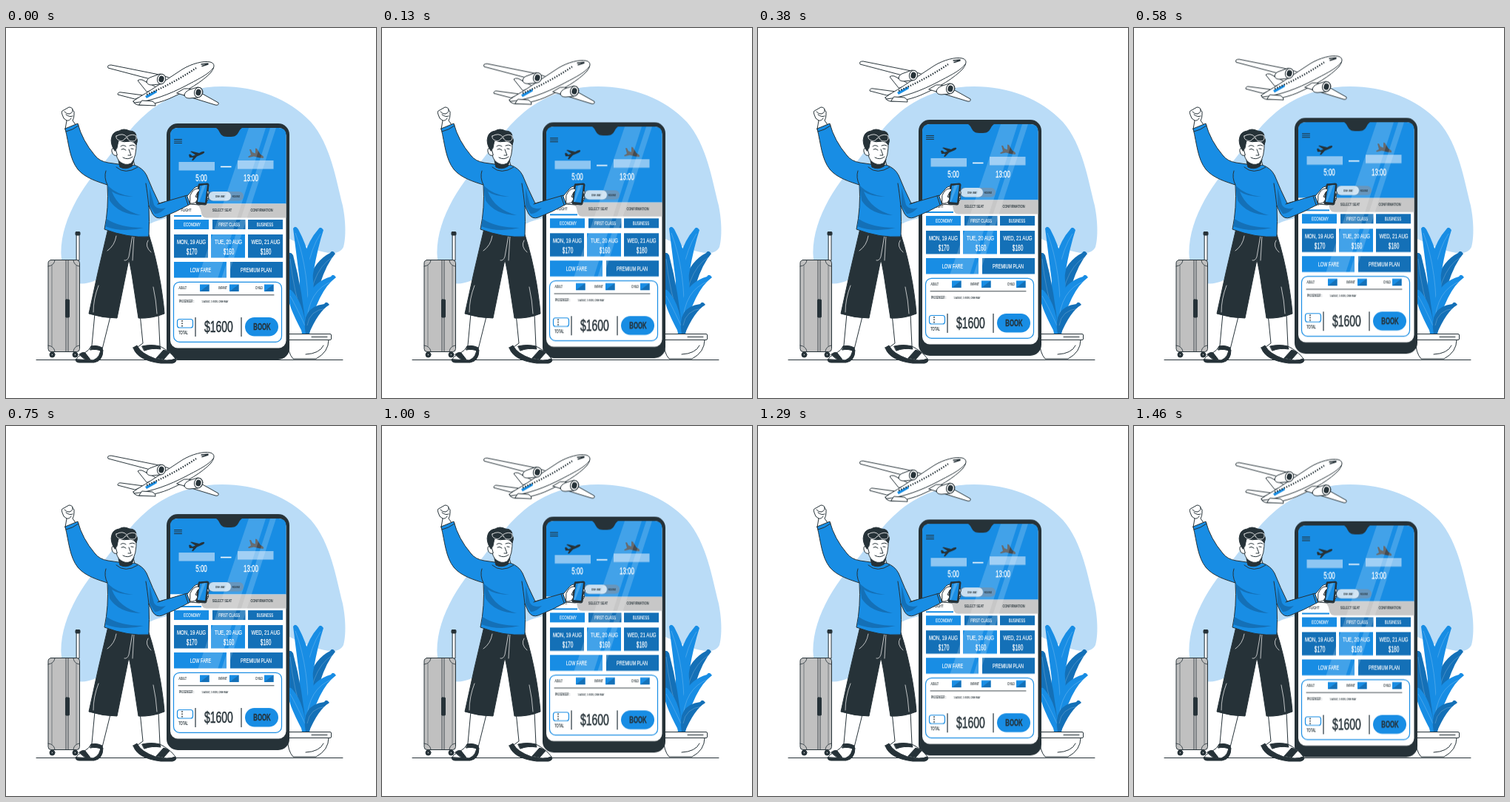
Animation, 500 px wide and 500 px high, one loop 1500 ms. Source, as an HTML page:

```html
<!DOCTYPE html>
<html lang="en">
<head>
<meta charset="utf-8">
<title>Flight booking</title>
<style>
html, body { margin: 0; width: 100%; height: 100%; overflow: hidden; background: #fff; }
svg { display: block; width: 100vw; height: 100vh; }
.float { animation: float 1500ms linear infinite; }
@keyframes float { 50% { transform: translateY(-10px); } }
.o { stroke: #263238; stroke-width: 1; stroke-linejoin: round; stroke-linecap: round; }
.n { fill: none; }
.w { fill: #fff; }
.d { fill: #263238; }
.b { fill: #188de4; }
.k { fill: #1470b7; }
.l { fill: #46a4e9; }
text { font-family: "Liberation Sans", Arial, sans-serif; text-anchor: middle; }
</style>
</head>
<body>
<svg viewBox="0 0 500 500">
  <path fill="#badcf7" d="M75 313C70 264 104 212 134 180C158 150 178 120 210 101C235 86 264 79 292 79C338 79 382 95 412 127C439 158 446 205 455 240C460 265 459 286 456 296C448 311 424 304 383 285C310 252 245 246 200 262C165 276 151 331 121 341C98 351 78 345 75 313Z"/>

  <path class="o n" d="M41 448.500H455"/>

  <g class="float o">
    <path class="w" d="M190 86L178 71Q180 69 184 70L205 81Z"/>
    <path class="w" d="M174 96L151 90Q151 86 156 87L186 91Z"/>
    <path class="w" d="M214 74L138 54Q136 50 142 50L197 61Q214 64 225 69Z"/>
    <path class="w" d="M172 99C178 94 190 88 200 81L238 56C251 48 267 44 276 46C283 48 282 53 277 60C265 73 244 85 226 93C210 101 190 105 178 104Q173 103 172 99Z"/>
    <path class="b" stroke="none" d="M188 92L203 84L204 87L190 95Z"/>
    <path class="n" d="M173 101C197 99 222 89 243 78S274 62 280 54"/>
    <path class="n" stroke-dasharray="1.6 1.8" d="M190 90Q226 75 257 54" style="stroke-linecap:butt;stroke-width:2.2"/>
    <path class="n" d="M264 49L273 48M265 51.500L273 49" style="stroke-width:1.4"/>
    <path class="w" d="M180 104L202 105Q203 102 198 99L184 98Z"/>
    <path class="w" d="M231 88L283 104Q288 105 287 101L262 87Q251 81 241 82Z"/>
    <path class="w" d="M190 73Q190 68 197 66L208 62Q216 63 215 70Q214 76 207 76L197 77Q191 77 190 73Z"/>
    <ellipse class="w" cx="210" cy="69" rx="5.600" ry="6.800" transform="rotate(15 210 69)"/>
    <ellipse class="d" cx="210" cy="69" rx="3" ry="4" transform="rotate(15 210 69)"/>
    <path class="w" d="M241 91Q241 86 249 83L259 80Q266 81 266 87Q265 93 259 94L248 95Q242 95 241 91Z"/>
    <ellipse class="w" cx="260" cy="87" rx="5.500" ry="6.700" transform="rotate(15 260 87)"/>
    <ellipse class="d" cx="260" cy="87" rx="3" ry="4" transform="rotate(15 260 87)"/>
  </g>

  <g id="plant"></g>
  <g class="o">
    <path class="w" d="M380 421H436Q436 438 419 447H388Q381 440 380 421Z"/>
    <rect class="w" x="374" y="413.500" width="65.500" height="8" rx="1.500"/>
    <path class="n" d="M413 417.500H434M405 441Q424 440 429 429"/>
  </g>

  <g class="float" id="phone">
    <rect class="d" x="217" y="129" width="166" height="319" rx="15"/>
    <rect class="w" x="222" y="135" width="156.500" height="297.500" rx="10"/>
    <path class="b" d="M222 237.500V145Q222 135 232 135H368.500Q378.500 135 378.500 145V237.500Z"/>
    <path class="d" d="M280 134C291 135 286 147 299 147H304C317 147 312 135 323 134Z"/>
    <path class="o n" d="M227.500 150.500H237.500M227.500 153H237.500M227.500 155.500H237.500"/>
    <path class="d" d="M247 171L249 170.500L252 173L256 171.500L249 167L251 166.500L261 169Q266 166 268 167Q269 169 264 171L258 173.500L253 179L251 179L253 175L248 175Z"/>
    <path fill="#464b50" d="M329 164L331 164L333 168L337 169.500L337 162.500L339 163L344 171Q349 173 348 175.500Q346 176 341 175L335 173.500L328 175L327 174L331 171.500Z"/>
    <path fill="#8ec6f2" d="M233.500 181H282V192.500H233.500ZM313 179H361.500V190.500H313Z"/>
    <path stroke="#fff" stroke-width="1.600" d="M290 187.500H304.500"/>
    <rect x="271" y="221" width="50" height="12.500" rx="6.200" fill="#467fae"/>
    <rect x="274" y="221" width="30" height="12.500" rx="6.200" fill="#c9dff0"/>
    <path fill="#c7c7c7" d="M222 237.500H378.500V256.500H270Q265 256.500 264 250Q262 238 254 237.500Z"/>
    <path class="w" d="M222 237.500H252Q260 238 262 247Q264 256 271 257H222Z"/>
    <path class="b" d="M227 253H264V255H227Z"/>
    <g id="buttons"></g>
    <rect x="226.500" y="343.300" width="146" height="81" rx="8" fill="#fff" stroke="#188de4" stroke-width="1.200"/>
    <path class="b" d="M262 346.500H274.500V356H262ZM302 346.500H314.500V356H302ZM349 346.500H361.500V356H349Z"/>
    <path class="k" d="M262 356L274.500 346.500V356ZM302 356L314.500 346.500V356ZM349 356L361.500 346.500V356Z"/>
    <path class="o n" d="M233 360.800H362" style="stroke-width:.9"/>
    <rect x="231.500" y="393.500" width="21" height="11.500" rx="3" fill="#fff" stroke="#188de4" stroke-width="1.200"/>
    <path class="o n" stroke-dasharray="1.700 1.700" d="M238 395V404" style="stroke-linecap:butt;stroke-width:1.5"/>
    <path stroke="#455158" stroke-width="1.400" d="M256 391V417M318 391V417"/>
    <rect class="b" x="323" y="391" width="45" height="25.500" rx="12.700"/>
    <path fill="#fff" opacity=".18" d="M328 135H351L285 342H258ZM357 135H365L298 342H290Z"/>
    <g id="labels"></g>
  </g>

  <g class="o" id="luggage">
    <path class="w" d="M95.500 279H99V314H95.500Z"/>
    <rect class="d" x="94" y="275.500" width="6" height="4.500" rx="1"/>
    <circle class="d" cx="62.500" cy="441.500" r="3.500"/><circle class="d" cx="93.500" cy="441.500" r="3.500"/>
    <circle class="w" cx="62.500" cy="441.500" r="1"/><circle class="w" cx="93.500" cy="441.500" r="1"/>
    <rect x="57" y="313.500" width="42.500" height="124" rx="4" fill="#c0c0c0"/>
    <path class="n" d="M81 314V437M84 314V437" style="stroke-width:.8"/>
    <path class="n" d="M62 321V430M95 321V430" style="stroke-width:.5"/>
    <rect class="d" x="80.500" y="367" width="5" height="24" rx="1"/>
    <path class="n" d="M57 322Q65 321 66 314M57 429Q65 430 66 437M99 322Q92 321 91 314M99 429Q92 430 91 437" style="stroke-width:.8"/>
  </g>

  <g class="o" id="man">
    <path class="w" d="M120 386L116 429Q112 436 105 440Q95 444 95 449H119Q128 447 130 434L142 386Z"/>
    <path class="w" d="M181 386L185 426L178 431Q183 440 202 447Q219 451 229 447Q222 437 208 430L206 386Z"/>
    <path class="d" d="M94 448Q94 452 99 452H119Q131 450 131 435L128 432Q128 445 118 449Z"/>
    <path class="d" d="M99 441Q104 437 107 439L114 448H107ZM115 430Q122 428 130 432L130 437Q122 433 114 435Z"/>
    <path class="d" d="M172 432L177 429Q182 440 201 447Q219 452 229 447Q232 451 225 453H209Q177 449 172 432Z"/>
    <path class="d" d="M184 430Q196 427 208 430L209 434Q197 432 187 436ZM203 446L213 435Q218 436 221 439L213 448Z"/>
    <path class="d" d="M138 271L193 279Q203 310 209 346Q213 371 214 386Q197 393 179 392L172 346Q169 325 166 313L150 392Q131 392 112 386Q124 329 138 271Z"/>
    <path class="n" d="M171 280L166 309Q164 315 160 314M173 280L171 314M149 281Q147 294 137 301M192 287Q187 295 196 303M118 384Q118 366 125 348M204 386Q203 368 199 350" style="stroke:#fff;stroke-width:.7"/>

    <path class="w" d="M80 137L82 125Q77 123 76 117Q74 112 78 111L85 107Q90 107 90 111Q93 112 92 117Q92 122 90 125L95 132Z"/>
    <path class="n" d="M79 113Q82 117 86 116Q91 114 90 110M81 117Q86 121 90 119M82 125Q86 126 88 122"/>
    <path class="w" d="M154 176L153 186Q159 195 168 191L174 186L172 178Z"/>
    <path class="b" d="M80 136L97 129Q103 152 120 172Q126 180 138 182L152 184Q161 192 173 185Q185 189 190 199Q198 219 207 237L245 226L249 238Q229 249 211 256Q203 259 198 251L193 240Q194 262 193 282Q165 284 133 272Q139 243 137 212C125 208 107 203 97 191C86 177 85 157 80 136Z"/>
    <path class="k" stroke="none" d="M137 212Q148 225 172 228Q153 228 143 221Q152 245 182 253Q152 252 140 233ZM136 258Q154 270 186 270Q157 277 134 268ZM194 216L200 239Q204 246 216 243Q207 252 201 251L194 240Z"/>
    <path class="n" d="M81 140Q90 138 98 132M137 212Q132 202 135 193M193 241Q191 222 189 210M242 227L246 239M149 188Q161 199 178 188M205 238L214 235"/>

    <path class="d" d="M152 179L154 188Q162 192 170 187L173 178Z"/>
    <path class="w" d="M147 153Q147 173 153 180Q161 187 169 183Q177 175 176 152Z"/>
    <path class="w" d="M148 164Q142 160 143 167Q145 174 150 172Z"/>
    <path class="d" d="M147 166Q140 156 143 147Q145 140 153 139Q159 135 167 139Q176 139 176 147Q179 152 176 158Q173 153 168 153Q159 155 152 152L150 162Z"/>
    <path class="n" d="M149 146Q158 141 163 147Q171 142 176 146Q177 153 171 153Q165 153 164 148L161 149Q158 154 153 152Q148 150 149 146Z" style="stroke:#fff;stroke-width:.8"/>
    <path class="n" d="M155 160Q158 157 162 160M167 159Q171 157 174 159M156 164Q159 162 162 165M169 163L172 163.500M166 164L169 172L165 172M158 175Q165 179 171 174"/>

    <path class="w" d="M245 227L252 219Q256 213 262 214L273 219Q275 223 273 227Q275 231 271 235Q268 239 261 239L249 238Z"/>
    <path class="d" d="M261 211L272 210Q274 210 274 212L271 237Q271 239 269 239L258 238Q256 237 257 235L260 213Q260 211 261 211Z"/>
    <path class="b" stroke="none" d="M262 213L272 212L269 236L259 235Z"/>
    <path class="l" stroke="none" d="M265 213L270 212L261 235H259Z"/>
    <path class="w" d="M249 226Q253 217 259 217Q264 218 259 222L256 228Q260 229 258 233Q256 238 249 237ZM272 220Q276 221 273 225M272 227Q275 228 272 231"/>
  </g>
</svg>
<script>
const el = id => document.getElementById(id);

// A leaf bends from base to a round tip through (cx, cy); w sets its fullness.
const leaf = ([x, y, cx, cy, bx, by, w, c]) =>
  `<path class="${c}" d="M${bx} ${by}Q${cx - w} ${cy} ${x - 3} ${y + 2}Q${x} ${y - 3} ${x + 4} ${y + 3}Q${cx + w} ${cy + 6} ${bx + 4} ${by}Z"/>` +
  `<path fill="none" stroke="#fff" stroke-opacity=".4" stroke-width=".5" d="M${bx + 2} ${by - 12}Q${cx} ${cy + 4} ${x} ${y + 8}"/>`;
el('plant').innerHTML = [
  [441, 302, 409, 325, 405, 414, 13, 'k'],
  [425, 270, 400, 312, 400, 414, 14, 'b'],
  [391, 269, 411, 326, 406, 414, 16, 'b'],
  [442, 334, 408, 349, 404, 414, 13, 'b'],
  [384, 304, 388, 350, 402, 414, 13, 'k'],
  [384, 354, 391, 370, 402, 414, 13, 'b'],
  [433, 371, 410, 377, 405, 414, 12, 'k']
].map(leaf).join('');

el('buttons').innerHTML = [
  [227, 259, 47, 13, 'b'], [279, 259, 44.5, 13, 'k'], [327, 259, 47, 13, 'k'],
  [227, 279, 46, 31.5, 'k'], [277, 279, 46, 31.5, 'b'], [327, 279, 47, 31.5, 'k'],
  [227, 316, 71, 21.5, 'b'], [303, 316, 71, 21.5, 'k']
].map(([x, y, w, h, c]) => `<rect class="${c}" x="${x}" y="${y}" width="${w}" height="${h}"/>`).join('');

// All screen text shares one condensed, slightly heavy look.
const label = ([s, x, y, size, fill = '#263238', weight = 400]) =>
  `<text transform="translate(${x} ${y}) scale(.64 1)" font-size="${size}" fill="${fill}" stroke="${fill}" stroke-width="${size * .025}" font-weight="${weight}">${s}</text>`;
const white = '#fff';
el('labels').innerHTML = [
  ['5:00', 264, 207.5, 12.6, white], ['13:00', 331, 207.5, 12.6, white],
  ['ONE WAY', 289.5, 229, 4.4], ['ROUND', 311, 229, 4.4],
  ['FLIGHT', 243.5, 248.3, 6.2], ['SELECT SEAT', 292, 248.3, 6.2], ['CONFIRMATION', 345.5, 248.3, 6.2],
  ['ECONOMY', 251.5, 268.3, 7, white], ['FIRST CLASS', 301.5, 268.3, 7, white], ['BUSINESS', 350, 268.3, 7, white],
  ['MON, 19 AUG', 250.5, 292.5, 9.6, white], ['$170', 251, 306, 10.2, white],
  ['TUE, 20 AUG', 300.5, 292.5, 9.6, white], ['$160', 301, 306, 10.2, white],
  ['WED, 21 AUG', 351, 292.5, 9.6, white], ['$180', 351, 306, 10.2, white],
  ['LOW FARE', 263, 330.3, 8.6, white], ['PREMIUM PLAN', 338, 330.3, 8.6, white],
  ['ADULT', 238.8, 353.5, 5.1], ['INFANT', 293, 353.5, 5.1], ['CHILD', 342, 353.5, 5.1],
  ['PASSENGER :', 244, 371, 4.8], ['1 ADULT, 1 KIDS, ONE WAY', 282.5, 371, 4.4],
  ['TOTAL', 239.5, 414, 6.3], ['$1600', 287.3, 411.5, 21.8], ['BOOK', 346, 408.3, 12.2, '#263238', 700]
].map(label).join('');
</script>
</body>
</html>
```
